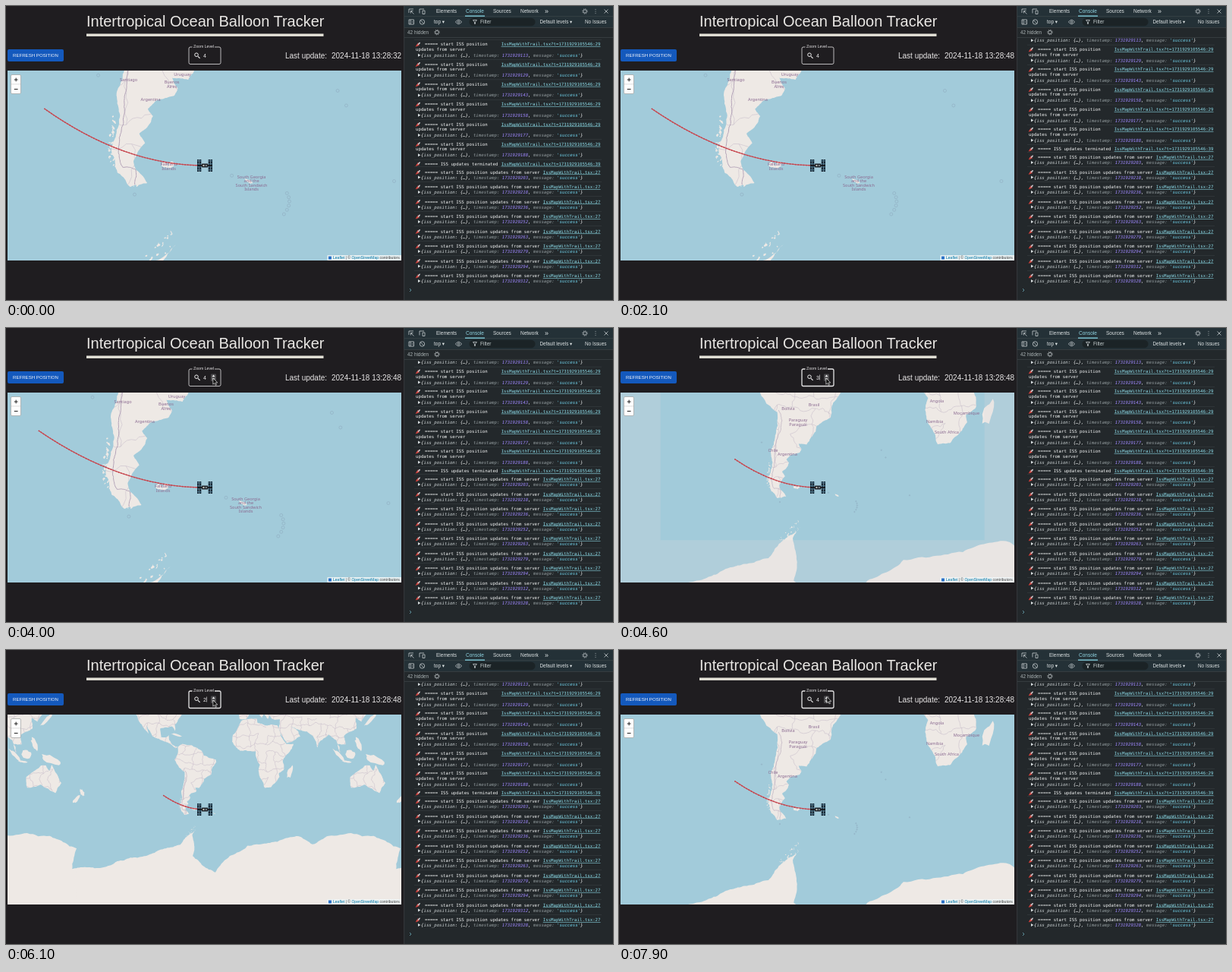
An HTML page with a canvas for the animation above (8000 ms loop, 800 by 387 pixels).

```html
<!DOCTYPE html>
<html lang="en">
<head>
<meta charset="utf-8">
<title>Tracker</title>
<style>
html, body { margin: 0; width: 100%; height: 100%; overflow: hidden; background: #1f1d20; }
canvas { position: absolute; left: 2px; top: 85px; }
svg { position: absolute; left: 0; top: 0; white-space: pre; font-family: "Liberation Sans", Arial, sans-serif; }
.mono { font: 5.73px "DejaVu Sans Mono", monospace; fill: #f4f6f6; }
.obj { font-style: italic; }
.link { fill: #8cdbe8; text-decoration: underline; }
.line { fill: none; stroke: #c4cbcd; stroke-width: .8; }
</style>
</head>
<body>
<canvas id="map" width="519" height="250"></canvas>
<svg id="ui" width="800" height="387"></svg>
<script>
const LOOP = 8000, UPDATE = 1800, CX = 262, CY = 210;
const clamp = v => Math.max(0, Math.min(1, v));
const ramp = (t, start, length) => clamp((t - start) / length);
const easeOut = p => 1 - (1 - p) ** 3;
const range = n => [...Array(n).keys()];

let seed = 7;
function random() {
  seed = (seed * 16807) % 2147483647;
  return seed / 2147483647;
}
const jitter = size => (random() - .5) * size;

// Geography: a few "lon lat" key points, projected to Mercator degrees, then roughened
const mercator = lat => -Math.log(Math.tan(Math.PI / 4 + lat * Math.PI / 360)) * 180 / Math.PI;
const points = s => s.split(",").map(p => {
  const [lon, lat] = p.trim().split(" ").map(Number);
  return [lon, mercator(lat)];
});

// Midpoint displacement: each pass doubles the number of corners
function roughen(pts, passes, amount = .16) {
  if (!passes) return pts;
  const finer = pts.flatMap(([x, y], i) => {
    if (i === pts.length - 1) return [[x, y]];
    const dx = pts[i + 1][0] - x, dy = pts[i + 1][1] - y, push = jitter(amount);
    return [[x, y], [x + dx / 2 - dy * push, y + dy / 2 + dx * push]];
  });
  return roughen(finer, passes - 1, amount);
}

function coast(s) {
  const pts = points(s);
  return roughen([...pts, pts[0]], 4);
}

function island(lon, lat, length, width, tilt) {
  const cos = Math.cos(tilt), sin = Math.sin(tilt);
  return range(14).map(i => {
    const a = i / 14 * 2 * Math.PI, r = .5 + jitter(.25);
    const u = Math.cos(a) * length * r, v = Math.sin(a) * width * r;
    return [lon + u * cos - v * sin, mercator(lat) + u * sin + v * cos];
  });
}

const archipelago = (lon0, lat0, lon1, lat1, count, spread) => range(count).map(i => {
  const p = i / count;
  return island(lon0 + (lon1 - lon0) * p + jitter(spread), lat0 + (lat1 - lat0) * p + jitter(spread),
    .3 + random() * .9, .2 + random() * .4, random() * 3);
});

const continents = [
  "-77.3 8.5,-72 12,-62 10.5,-51 4.3,-48.5 -1,-35.5 -5.2,-34.8 -8,-39 -13.5,-40.5 -21.5,-48.3 -25.7,-48.7 -28.3,-53.8 -34.6,-58.3 -34.2,-56.7 -36.6,-57.7 -38.2,-62 -39,-65 -41,-63.6 -42.5,-65.5 -45,-67.4 -46,-65.8 -47.8,-69 -51,-68.4 -52.5,-65.2 -54.7,-70 -55.3,-73.5 -53,-75.2 -49,-73 -44,-73.6 -37.2,-71.5 -32,-70.2 -18.5,-76.2 -14,-81.2 -5.5,-77.3 4",
  "-125 46,-120.5 34.5,-110 23,-112.5 31,-105.5 20,-92 14.5,-80 7.3,-77.3 8.5,-83.5 11,-87 16,-87.5 21.3,-91 18.7,-96 19,-97 28,-84 30,-80.5 25.5,-81 31.5,-70 43,-70 46",
  "-6 35.8,10 37.3,11 33.5,20 31,32.5 31.2,37.2 20,43 11.8,51 11.8,46 2.5,39 -6.5,40.5 -15.5,34.8 -20,35.4 -23.8,32.5 -28,26 -33.8,19 -34.5,15 -26,12 -17.5,13.7 -11,9 -1,9 4,-2 5,-8 4.4,-13 8.5,-17.3 14.7,-16.5 21.5,-10 30",
  "-9 44,-9 37,-2 36.8,4 43.3,12 42,16 38,17.5 40.5,13 45,22.5 36.8,24 40.5,27 37,36 36.5,34.5 28,43.5 13,58.5 20,56 25.5,48 30,66 25,73 20,77.5 8,80.5 15,90 22,98.5 16,103 1.5,100 12,109 11.5,107 20,121 28,120 38,126.5 34.5,129 38,137 46,137 60,-9 60",
  "114 -24,115 -34.3,130 -31.5,138 -35,146.5 -39,153 -30,146 -18.5,142.5 -11,140 -17.5,136 -12,130 -12,122 -18"
].map(coast);
const antarctica = coast("-190 -77.5,-158 -77,-145 -75.5,-115 -74,-100 -72.3,-91 -71.5,-75 -70.2,-66.5 -66.5,-57 -63.3,-61.5 -66,-61 -74,-36 -78.3,-20 -74,0 -70.5,33 -69,57 -66.7,72 -70,90 -66.5,140 -66.5,170 -71.5,165 -77.5,190 -77.5,190 -85.1,-190 -85.1");
const islands = [
  island(47, -19, 14, 5, 1.9), island(176, -38.7, 9, 4, 1.1), island(170, -44, 11, 4, 2.3), island(141, -5.5, 22, 8, .4),
  island(114, .5, 10, 9, 0), island(101, 0, 16, 4, .8), island(110, -7.5, 10, 2, .1), island(123, 12, 14, 5, 1.2),
  island(137, 36.5, 18, 4, 2.3), island(-79, 21.5, 11, 2, .3), island(-60.3, -51.7, 1.9, 1.3, .6), island(-58.6, -51.7, 1.9, 1.4, 2.4),
  island(-37, -54.4, 2.4, .7, .5),
  ...archipelago(-74.5, -43, -75.6, -51, 24, 1), ...archipelago(-75, -51, -68, -55.5, 20, 1),
  ...archipelago(-68, -67, -58, -62.3, 30, 2)
];
const land = [...continents, antarctica, ...islands];

// Country borders: a jittered lattice, later clipped to the continents
const STEP = 10;
const nodes = range(14).map(j => range(37).map(i => [i * STEP - 180 + jitter(7), j * STEP - 62 + jitter(7)]));
const borders = nodes.flatMap((row, j) => row.flatMap((node, i) =>
  [row[i + 1], nodes[j + 1]?.[i]].filter(next => next && random() < .75).map(next => roughen([node, next], 3, .4))));
const andes = roughen(points("-69.5 -17.5,-67.5 -23,-70 -31,-71 -37,-71.8 -44,-73.2 -49.5,-72 -52.1,-68.5 -52.4,-68.6 -55"), 4);

const rings = [
  ...points("-41.7 -53.5,-12.3 -37.1,-9.9 -40.3,3.4 -54.4,-78.8 -33.6,-68.7 -56.5"),
  ...range(6).map(i => [-25.7 - 1.5 * ((i - 2) / 3) ** 2, mercator(-56.3 - .62 * i)])
];

// Labels: text lines joined by "/", offset in pixels from the centre
const labels = {
  4: [["Santiago", -108, -113], ["Argentina", -79, -87], ["Buenos/Aires", -51, -107], ["Uruguay", -37, -120],
      ["Falkland/Islands", -55, 1], ["South Georgia/and the/South Sandwich/Islands", 54, 23]],
  3: [["Brasil", -5, -109], ["Bolivia", -39, -104], ["Paraguay/Paraguái", -26, -86], ["Chile", -59, -49],
      ["Argentina", -40, -44], ["Angola", 157, -114], ["Moçambique", 196, -98], ["Namibia", 154, -87], ["South Africa", 170, -73]]
};

const ctx = document.getElementById("map").getContext("2d");
const steps = [[4350, 3], [4850, 2], [7000, 3]];
const centreY = mercator(-51.8), finalLon = -47.6;

function drawWorld(zoom, lon, ppd, X, Y) {
  const trace = (pts, shift) => pts.forEach(([l, m], i) => ctx[i ? "lineTo" : "moveTo"](X(l + shift), Y(m)));
  const level = Math.round(zoom), scale = 2 ** (zoom - level);
  ctx.fillStyle = "#a2cbda";
  ctx.fillRect(0, 80, 525, 260);
  for (const shift of [-360, 0]) {
    ctx.fillStyle = "#eee9e5";
    for (const pts of land) {
      ctx.beginPath();
      trace(pts, shift);
      ctx.fill();
    }
    ctx.save();
    ctx.beginPath();
    for (const pts of continents) trace(pts, shift);
    ctx.clip();
    ctx.beginPath();
    for (const pts of borders) trace(pts, shift);
    ctx.strokeStyle = "#c9c0cb";
    ctx.lineWidth = .6;
    ctx.stroke();
    ctx.beginPath();
    trace(andes, shift);
    ctx.strokeStyle = "#b3a3b7";
    ctx.lineWidth = level === 4 ? 1 : .6;
    ctx.stroke();
    ctx.restore();
  }
  if (level > 2) {
    ctx.strokeStyle = "#8fabc0";
    ctx.lineWidth = .6;
    for (const [l, m] of rings) {
      ctx.beginPath();
      ctx.arc(X(l), Y(m), (level === 4 ? 2 : .7) * scale, 0, 7);
      ctx.stroke();
    }
  }
  ctx.font = `${5.6 * scale}px "Noto Sans", sans-serif`;
  ctx.textAlign = "center";
  ctx.fillStyle = "#8b6b91";
  for (const [text, dx, dy] of labels[level] || []) {
    text.split("/").forEach((line, i, all) => ctx.fillText(line,
      CX + dx * scale + (finalLon - lon) * ppd, CY + (dy + 2 + (i - (all.length - 1) / 2) * 5.6) * scale));
  }
}

// Grey cover over every tile outside the loaded block
function drawVeil(alpha, left, right, bottom, X, Y) {
  ctx.globalAlpha = alpha;
  ctx.fillStyle = "#d9d7da";
  ctx.beginPath();
  ctx.rect(2, 85, 519, 250);
  ctx.rect(X(left), Y(0), X(right) - X(left), Y(bottom) - Y(0));
  ctx.fill("evenodd");
  ctx.globalAlpha = 1;
}

function drawTrail(zoom, lon) {
  const scale = 2 ** (zoom - 4), x = CX + (-93.8 - lon) * 4.744 * scale;
  ctx.beginPath();
  ctx.moveTo(x, CY - 75 * scale);
  ctx.quadraticCurveTo((x + CX) / 2, CY, CX, CY);
  ctx.strokeStyle = "#d04a52";
  ctx.lineWidth = 1.5;
  ctx.stroke();
  ctx.setLineDash([1.2, 2.4]);
  ctx.strokeStyle = "#b8434c";
  ctx.stroke();
  ctx.setLineDash([]);
}

function drawMap(t) {
  let zoom = 4, level = 4;
  for (const [start, next] of steps) {
    zoom += (next - level) * easeOut(ramp(t, start, 250));
    level = next;
  }
  const lon = finalLon - 1.6 * (1 - easeOut(ramp(t, UPDATE, 250)));
  const ppd = 1.186 * 2 ** (zoom - 2);
  const X = l => CX + (l - lon) * ppd, Y = m => CY + (m - centreY) * ppd;
  ctx.setTransform(1, 0, 0, 1, -2, -85);
  drawWorld(zoom, lon, ppd, X, Y);
  if (t >= 4350 && t < 4850) drawVeil(1 - ramp(t, 4450, 200), -135, 45, 90, X, Y);
  else if (t >= 4850 && t < 7000) drawVeil(1 - ramp(t, 5200, 250), -180, 90, 180, X, Y);
  drawTrail(zoom, lon);
}

// Interface
const text = (x, y, size, fill, str, extra = "") => `<text x="${x}" y="${y}" font-size="${size}" fill="${fill}" ${extra}>${str}</text>`;
const box = (x, y, w, h, fill, extra = "") => `<rect x="${x}" y="${y}" width="${w}" height="${h}" fill="${fill}" ${extra}/>`;
const path = (d, extra = 'class="line"') => `<path d="${d}" ${extra}/>`;
const gear = (x, y) => `<circle cx="${x}" cy="${y}" r="2.2" class="line"/><circle cx="${x}" cy="${y}" r="3.2" class="line" stroke-dasharray="1.2 1.3"/>`;
const pale = "#dde2e3", middle = 'text-anchor="middle"';

function satellite() {
  const panel = x => box(x, 202, 2.4, 16, "#14202c") + range(4).map(i => box(x + .5, 202.7 + i * 4, 1.4, 2, "#41708a")).join("");
  return [252, 254.9, 266.7, 269.6].map(panel).join("") + box(252, 209.2, 20, 1.8, "#16191e") +
    box(257.8, 207.6, 8.4, 5, "#20242a", 'rx="1"') + box(259.5, 209, 2, 2, "#c9c5bb") + box(263, 209, 1.6, 2, "#8f9aa0");
}

function page() {
  return text(106, 27, 20, "#e9e7e4", "Intertropical Ocean Balloon Tracker") + box(106, 36.5, 312.5, 3.4, "#e4e2d8") +
    box(2, 57, 74, 16, "#1459bd", 'rx="2"') + text(39, 67.3, 6.1, "#f2f5fa", "REFRESH POSITION", middle) +
    text(368, 69, 10, "#e8e6e6", "Last update:") + text(429, 69, 10, "#e8e6e6", "", 'id="clock"') +
    box(241, 54, 42, 22.5, "none", 'id="field" rx="2" stroke="#e4e3e4"') + box(245.5, 51, 29.5, 5, "#1f1d20") +
    text(247, 55, 5.2, "#e2e0e2", "Zoom Level") +
    path("M253 66.3l2.6 2.6", 'stroke="#eee" stroke-width="1.2"') +
    '<circle cx="251" cy="64.2" r="2.3" fill="none" stroke="#eee"/>' + text(260, 67.6, 7, "#f0eff0", "", 'id="level"') +
    box(264.3, 61.5, .6, 7, "#eee", 'id="caret"') +
    `<g id="spinner">${box(270, 60.5, 7, 9.5, "#4b4a4d", 'rx="1"')}${path("M271.5 64.2l2-2.6 2 2.6zM271.5 66.4l2 2.6 2-2.6z", 'fill="#eee"')}</g>` +
    box(6.5, 90.5, 13, 25, "#fff", 'rx="1.5" stroke="#a7a9a8" stroke-width=".8"') + box(7, 102.7, 12, .5, "#bbb") +
    path("M10.8 97h4.8M13.2 94.6v4.8M10.8 109.5h4.8", 'stroke="#222" stroke-width="1"') +
    satellite() + box(423.5, 328, 97.5, 7, "#eef3f4", 'opacity=".9"') + box(425, 329.5, 4, 4, "#2a71c8") +
    text(431, 333.3, 5.05, "#444", '<tspan fill="#0078a8">Leaflet</tspan> | © <tspan fill="#0078a8">OpenStreetMap</tspan> contributors');
}

function toolbar() {
  const tabs = [["Elements", 567], ["Console", 606], ["Sources", 642], ["Network", 678]];
  return box(524.5, 0, 275.5, 387, "#23282b") + box(524.5, 0, 275.5, 28, "#243137") + box(524.5, 0, .6, 387, "#454b4e") +
    [13.6, 28, 41].map(y => box(525, y, 275, .5, "#485053")).join("") +
    tabs.map(([name, x], i) => text(x, 9.2, 6.5, i === 1 ? "#8fd3e0" : pale, name)).join("") + box(605, 12.5, 26, 1.4, "#7fc9d8") +
    text(710, 9.5, 9, pale, "»") + gear(763, 7) +
    path("M777 4v.9M777 6.6v.9M777 9.2v.9M788.5 4.5l5 5M793.5 4.5l-5 5") +
    path("M531 9V4h6M533.5 6.5l4 4M533.5 9.5v-3h3M545 9.5V4h6M549 6h3v4.5h-3z") +
    path("M531 18h6.5v6H531zM533 18v6M534.5 21h2") + '<circle cx="548.5" cy="21" r="3.2" class="line"/>' + path("M546.3 18.8l4.4 4.4") +
    text(564, 23.3, 6.5, pale, "top ▾") + path("M592.5 21q4-5.5 8 0q-4 5.5-8 0z") + '<circle cx="596.5" cy="21" r="1.2" class="line"/>' +
    box(610.5, 15.7, 87, 10.6, "#1b2326", 'rx="5.3"') + path("M615.5 18.5h5l-2 2.6v2.4h-1v-2.4z") +
    text(625, 23.3, 6.5, "#c5cdcf", "Filter") + text(703.5, 23.3, 6.3, pale, "Default levels ▾") + text(763, 23.3, 6.4, pale, "No Issues") +
    text(529, 37.2, 6.4, "#a9b1b3", "42 hidden") + gear(568, 34.6) + path("M532 372l2 2-2 2", 'fill="none" stroke="#6fb0c0" stroke-width=".8"');
}

const wrapped = [113, 129, 143, 158, 177, 188], plain = [203, 218, 236, 252, 263, 279, 294, 312];

// Rows are laid out upwards from the prompt
function consoleRows(recent) {
  let y = 367, out = "";
  const mono = (x, dy, str, cls = "", extra = "") => `<text x="${x}" y="${y - dy}" class="mono ${cls}" ${extra}>${str}</text>`;
  const head = (dy, str, link) => `<g transform="translate(540 ${y - dy - 4.5})">` +
    path("M1 3.6L4.6.2L6 0L5.6 1.5L2.4 5z", 'fill="#c9ccd0"') + path("M.3 5.4L2 2.6L3.3 4zM2 1.6l1.4-.2M4 4.6l.4-1.6", 'fill="#e0483e" stroke="#d33b36" stroke-width=".8"') +
    "</g>" + mono(552, dy, "===== " + str) + mono(783.5, dy, "IssMapWithTrail.tsx" + link, "link", 'text-anchor="end"');
  const object = stamp => path(`M543 ${y - 7}l3.4 2-3.4 2z`, 'fill="#d5dbdd"') + mono(547, 3,
    `{<tspan fill="#ccd3d5">iss_position</tspan>: {…}, <tspan fill="#929b9e">timestamp: </tspan><tspan fill="#9f88ff">1731929${stamp}</tspan>, <tspan fill="#929b9e">message: </tspan><tspan fill="#72d5ee">'success'</tspan>}`, "obj");
  const advance = h => { y -= h; out += box(538, y + .6, 247, .4, "#43494c"); };
  for (const stamp of [...recent].reverse()) {
    out += head(10, "start ISS position updates from server", ":27") + object(stamp);
    advance(19.5);
  }
  out += head(1.3, "ISS updates terminated", "?t=1731929105546:39");
  advance(9.7);
  for (const stamp of [...wrapped].reverse()) {
    out += head(17.5, "start ISS position", "?t=1731929105546:29") + mono(540, 11, "updates from server") + object(stamp);
    advance(26.3);
  }
  return out;
}

const ui = document.getElementById("ui");
ui.innerHTML = '<clipPath id="log"><rect x="525" y="41.5" width="275" height="340"/></clipPath>' + page() + toolbar() +
  '<g id="rows" clip-path="url(#log)"></g>' +
  path("M0 0V8.2L2 6.4L3.3 9.3L4.7 8.7L3.4 5.9H6z", 'id="pointer" fill="#111" stroke="#fff" stroke-width=".6"');
const [clock, field, level, caret, spinner, rows, pointer] =
  ["clock", "field", "level", "caret", "spinner", "rows", "pointer"].map(id => document.getElementById(id));
const show = (node, on) => node.setAttribute("visibility", on ? "visible" : "hidden");
let shown = null;

function drawUi(t) {
  const updated = t >= UPDATE;
  if (updated !== shown) {
    shown = updated;
    clock.textContent = "2024-11-18 13:28:" + (updated ? 48 : 32);
    rows.innerHTML = consoleRows(updated ? [...plain, 328] : plain);
  }
  const last = steps.filter(([start]) => t >= start).pop();
  level.textContent = t >= 7850 || !last ? 4 : last[1];
  field.setAttribute("stroke-width", last ? 1.3 : .8);
  show(caret, last && (t - last[0]) % 1000 < 500);
  show(spinner, t >= 3800);
  show(pointer, t >= 3400);
  const enter = 1 - easeOut(ramp(t, 3400, 500)), lift = easeOut(ramp(t, 6350, 350));
  pointer.setAttribute("transform", `translate(${272.8 + enter * 24 + lift} ${66 + enter * 40 - lift * 4.5})`);
}

const begin = performance.now();
function frame() {
  const t = (performance.now() - begin) % LOOP;
  drawMap(t);
  drawUi(t);
  requestAnimationFrame(frame);
}
frame();
</script>
</body>
</html>
```
